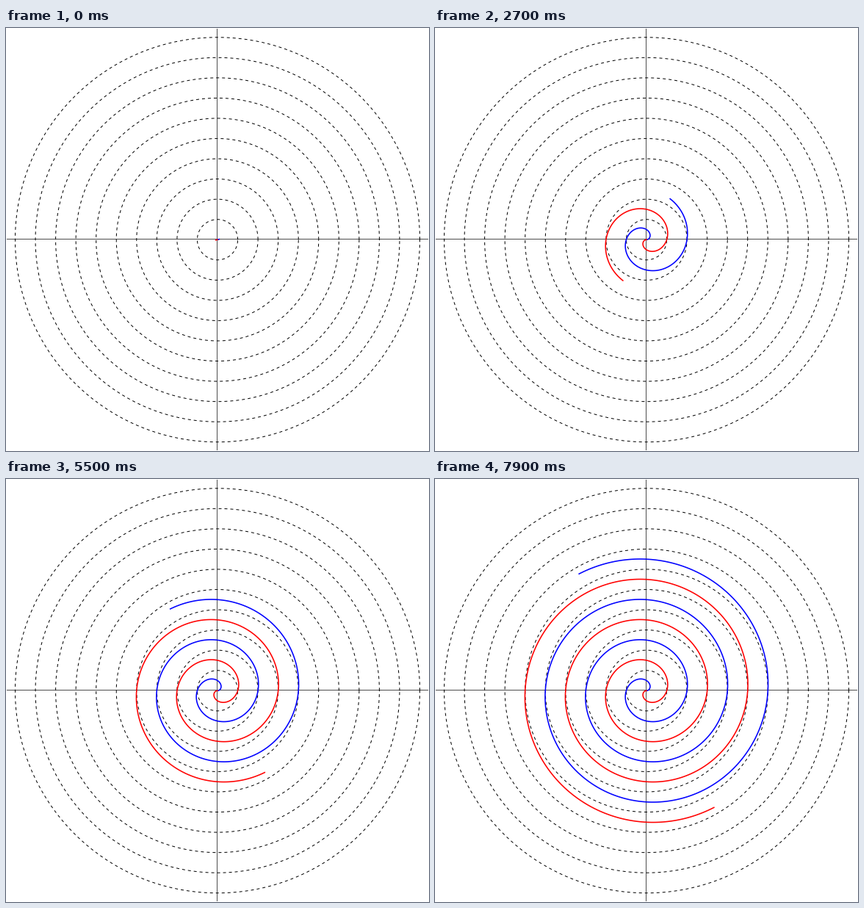
A matplotlib script for the animation above (8000 ms loop, 576 px wide and 576 px high).

```python
import numpy as np
import matplotlib.pyplot as plt
from matplotlib.animation import FuncAnimation

SIZE = 576
FRAMES = 80
STEP = 15            # degrees added per frame
RING = 27.55         # ring spacing; each arm gains one ring per half turn
CX, CY = 288, 288.25

plt.rcParams.update({"path.simplify": False, "path.snap": False})
fig = plt.figure(figsize=(SIZE / 72, SIZE / 72), dpi=72, facecolor="white")
ax = fig.add_axes([0, 0, 1, 1])
ax.set(xlim=(0, SIZE), ylim=(SIZE, 0))   # pixels, y down
ax.axis("off")


def polar(r, t, sign=1):
    return CX + sign * r * np.cos(t), CY - sign * r * np.sin(t)


axis_style = dict(color="0.3", lw=1, solid_capstyle="butt", zorder=1)
ax.plot([1, 575], [287.5, 287.5], **axis_style)
ax.plot([287.5, 287.5], [1, 575], **axis_style)

turn = np.linspace(0, 2 * np.pi, 1441)
for k in range(1, 11):
    ax.plot(*polar(RING * k, turn), color="black", lw=1, ls=(0, (4, 4)),
            dash_capstyle="butt", zorder=2)

arm_style = dict(lw=1.6, solid_capstyle="projecting",
                 solid_joinstyle="round", zorder=3)
blue, = ax.plot([], [], color="blue", **arm_style)
red, = ax.plot([], [], color="red", **arm_style)


def update(i):
    end = STEP * (i + 1)
    t = np.radians(np.linspace(0, end, end + 1))
    r = RING * t / np.pi
    blue.set_data(*polar(r, t))
    red.set_data(*polar(r, t, -1))
    return blue, red


anim = FuncAnimation(fig, update, frames=FRAMES, interval=100,
                     repeat=True, repeat_delay=0, blit=False)
plt.show()
```
